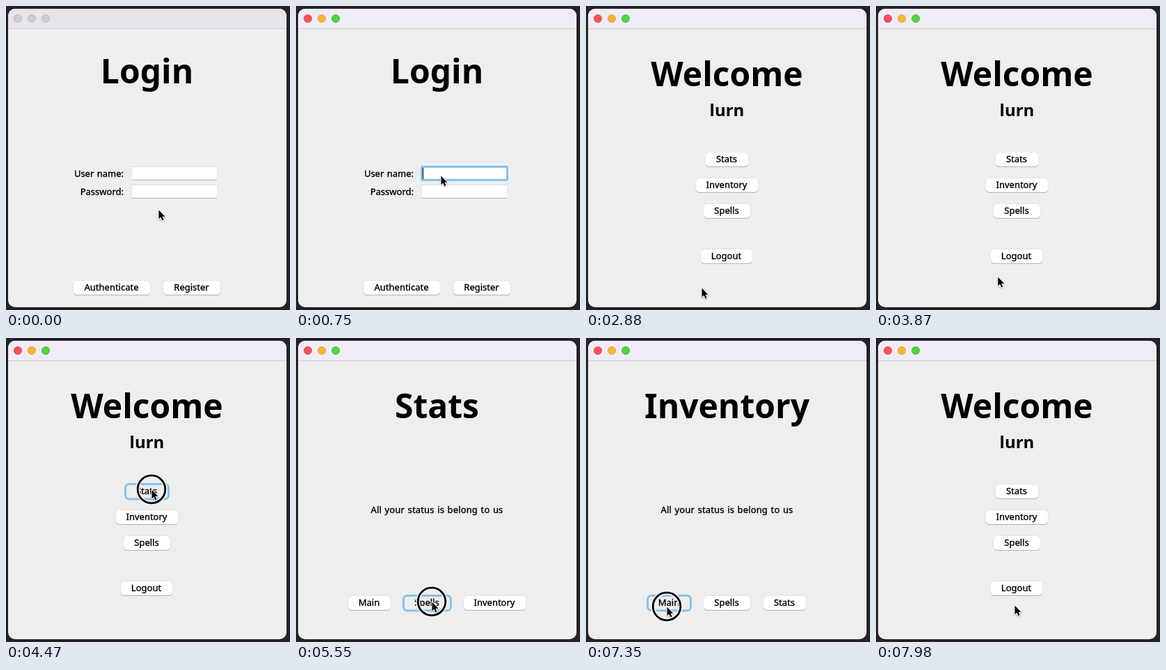
Write an HTML page with a canvas that moves like this. It is 408 px wide and 436 px high and loops after 8000 ms.

```html
<!DOCTYPE html>
<html lang="en">
<head>
<meta charset="utf-8">
<title>Login demo</title>
<style>
  html, body { margin: 0; height: 100%; overflow: hidden; background: #242226; }
  canvas { display: block; width: 408px; height: 436px; }
</style>
</head>
<body>
<canvas id="stage"></canvas>
<script>
const LOOP = 8000, CENTER = 202.5, USER = 'lurn';
const FONT = '"Noto Sans", "Open Sans", sans-serif';
const canvas = document.getElementById('stage');
const ctx = canvas.getContext('2d');
const ratio = window.devicePixelRatio || 1;
canvas.width = 408 * ratio;
canvas.height = 436 * ratio;

const WIDTHS = { Main: 61, Stats: 61, Spells: 67, Inventory: 89, Logout: 74, Authenticate: 110, Register: 82 };

function row(y, ...labels) {
  const gap = 19;
  const total = labels.reduce((sum, label) => sum + WIDTHS[label] + gap, -gap);
  let x = Math.floor(CENTER - total / 2);
  return labels.map(label => {
    const button = { label, x, y, w: WIDTHS[label], h: 20 };
    x += button.w + gap;
    return button;
  });
}

const PAGES = {
  Login: row(394, 'Authenticate', 'Register'),
  Welcome: [...row(210, 'Stats'), ...row(247, 'Inventory'), ...row(284, 'Spells'), ...row(349, 'Logout')],
  Stats: row(370, 'Main', 'Spells', 'Inventory'),
  Spells: row(370, 'Main', 'Stats', 'Inventory'),
  Inventory: row(370, 'Main', 'Spells', 'Stats')
};

// Each click shows a ring; the next page opens when it ends.
const CLICKS = [
  { from: 690, to: 750, next: 'Login' },
  { from: 2790, to: 2880, next: 'Welcome' },
  { from: 4440, to: 4500, next: 'Stats' },
  { from: 5550, to: 5610, next: 'Spells' },
  { from: 6390, to: 6450, next: 'Inventory' },
  { from: 7350, to: 7440, next: 'Welcome' }
];
const ACTIVATED = 690;
const KEYS = [1500, 1590, 1710, 1800];

// Pointer moves: time span, destination, optional curve control point.
const START = [219, 292];
const MOVES = [
  { from: 30, to: 510, end: [208, 243] },
  { from: 2100, to: 2260, end: [181, 308] },
  { from: 2280, to: 2550, end: [166, 404] },
  { from: 3780, to: 4260, end: [209, 217], via: [215, 320] },
  { from: 4710, to: 5160, end: [195, 378], via: [232, 300] },
  { from: 5760, to: 6060, end: [259, 381] },
  { from: 6570, to: 7080, end: [116, 385], via: [185, 399] },
  { from: 7680, to: 7980, end: [199, 383], via: [160, 402] }
];

const ease = p => p * p * (3 - 2 * p);

function pointerAt(t) {
  let pos = START;
  for (const { from, to, end, via } of MOVES) {
    if (t < from) break;
    const p = ease(Math.min(1, (t - from) / (to - from)));
    const begin = pos;
    pos = end.map((e, i) => {
      const c = via ? via[i] : (begin[i] + e) / 2;
      return (1 - p) ** 2 * begin[i] + 2 * p * (1 - p) * c + p * p * e;
    });
  }
  return pos;
}

function box(x, y, w, h, r, fill) {
  ctx.beginPath();
  ctx.roundRect(x, y, w, h, r);
  ctx.fillStyle = fill;
  ctx.fill();
}

function circle(x, y, r) {
  ctx.beginPath();
  ctx.arc(x, y, r, 0, 7);
}

function stroke(color, width) {
  ctx.strokeStyle = color;
  ctx.lineWidth = width;
  ctx.stroke();
}

// Body text gets a hairline outline for a medium weight.
function text(string, x, y, align = 'center') {
  ctx.font = `13px ${FONT}`;
  ctx.wordSpacing = '1px';
  ctx.textAlign = align;
  ctx.fillStyle = ctx.strokeStyle = '#000';
  ctx.lineWidth = 0.35;
  ctx.fillText(string, x, y);
  ctx.strokeText(string, x, y);
}

function heading(string, y, size) {
  ctx.font = `700 ${size}px ${FONT}`;
  ctx.textAlign = 'center';
  ctx.fillStyle = '#000';
  ctx.fillText(string, CENTER, y);
}

function drawWindow(active) {
  ctx.fillStyle = '#242226';
  ctx.fillRect(0, 0, 408, 436);
  box(3, 4, 400, 428, 10, '#eee');
  box(3, 4, 400, 28, [10, 10, 0, 0], active ? '#f0ecf7' : '#e8e4ec');
  ctx.fillStyle = '#d0cdd3';
  ctx.fillRect(3, 32, 400, 1);
  const lights = active
    ? [['#f4525a', '#dd4049'], ['#f5b636', '#dda02c'], ['#4fd641', '#3cbd32']]
    : Array(3).fill(['#cfcbd2', '#b7b3ba']);
  lights.forEach(([fill, edge], i) => {
    circle(17 + i * 20, 18, 5.6);
    ctx.fillStyle = fill;
    ctx.fill();
    stroke(edge, 0.8);
  });
}

function drawButton({ label, x, y, w, h }, pressed) {
  box(x - 0.5, y - 0.5, w + 1, h + 1.5, 5.5, '#dadada');
  box(x, y + 1, w, h, 5, '#b4b4b4');
  box(x, y, w, h, 5, pressed ? '#eee' : '#fff');
  if (pressed) {
    ctx.beginPath();
    ctx.roundRect(x - 0.5, y - 0.5, w + 1, h + 1.5, 5.5);
    stroke('#82c5eb', 3);
  }
  text(label, x + w / 2 - 0.5, y + 14);
}

function drawField(y, focused) {
  ctx.fillStyle = '#dcdcdc';
  ctx.fillRect(180.5, y, 123, 19);
  ctx.fillStyle = '#fff';
  ctx.fillRect(181, y + 1, 122, 18);
  ctx.fillStyle = '#b4b4b4';
  ctx.fillRect(181, y + 19, 122, 1);
  if (focused) {
    ctx.beginPath();
    ctx.roundRect(180.5, y + 0.5, 123, 19, 1);
    stroke('#7fc4ec', 3);
  }
}

function drawForm(t) {
  const focused = t >= ACTIVATED && t < 2790;
  text('User name:', 169, 245, 'right');
  text('Password:', 169, 271, 'right');
  drawField(230, focused);
  drawField(256, false);
  const typed = USER.slice(0, KEYS.filter(k => t >= k).length);
  text(typed, 182, 245, 'left');
  const lastReset = Math.max(ACTIVATED, ...KEYS.filter(k => t >= k));
  if (focused && (t - lastReset) % 1020 < 510) {
    ctx.fillStyle = '#000';
    ctx.fillRect(Math.round(182 + ctx.measureText(typed).width), 232, 1, 16);
  }
}

function drawPage(page, t, target) {
  const login = page === 'Login';
  heading(page, login ? 111 : 115, 48);
  if (login) drawForm(t);
  else if (page === 'Welcome') heading(USER, 158, 24);
  else {
    ctx.letterSpacing = '0.15px';
    text('All your status is belong to us', CENTER, 251);
    ctx.letterSpacing = '0px';
  }
  PAGES[page].forEach(button => drawButton(button, button === target));
}

function drawRing(x, y) {
  circle(x, y, 19.8);
  stroke('#f2f2f2', 6);
  stroke('#000', 2.8);
}

const ARROW = new Path2D('M.5 .8V13.4L3.3 10.8L5.4 15.4L7.5 14.5L5.5 10H9.4Z');

function drawPointer(x, y) {
  ctx.save();
  ctx.translate(x, y);
  ctx.lineJoin = 'round';
  ctx.shadowColor = 'rgba(0,0,0,.3)';
  ctx.shadowBlur = 2 * ratio;
  ctx.shadowOffsetY = ratio;
  ctx.strokeStyle = '#fff';
  ctx.lineWidth = 2;
  ctx.stroke(ARROW);
  ctx.shadowColor = 'transparent';
  ctx.fillStyle = '#000';
  ctx.fill(ARROW);
  ctx.restore();
}

function draw(t) {
  const [x, y] = pointerAt(t);
  const page = CLICKS.filter(c => t >= c.to).pop()?.next ?? 'Login';
  const clicking = CLICKS.some(c => t >= c.from && t < c.to);
  const target = clicking && PAGES[page].find(b => x >= b.x && x <= b.x + b.w && y >= b.y && y <= b.y + b.h);
  ctx.setTransform(ratio, 0, 0, ratio, 0, 0);
  drawWindow(t >= ACTIVATED);
  drawPage(page, t, target);
  if (clicking) drawRing(x, y);
  drawPointer(x, y);
}

const began = performance.now();
function tick() {
  draw((performance.now() - began) % LOOP);
  requestAnimationFrame(tick);
}
tick();
</script>
</body>
</html>
```
